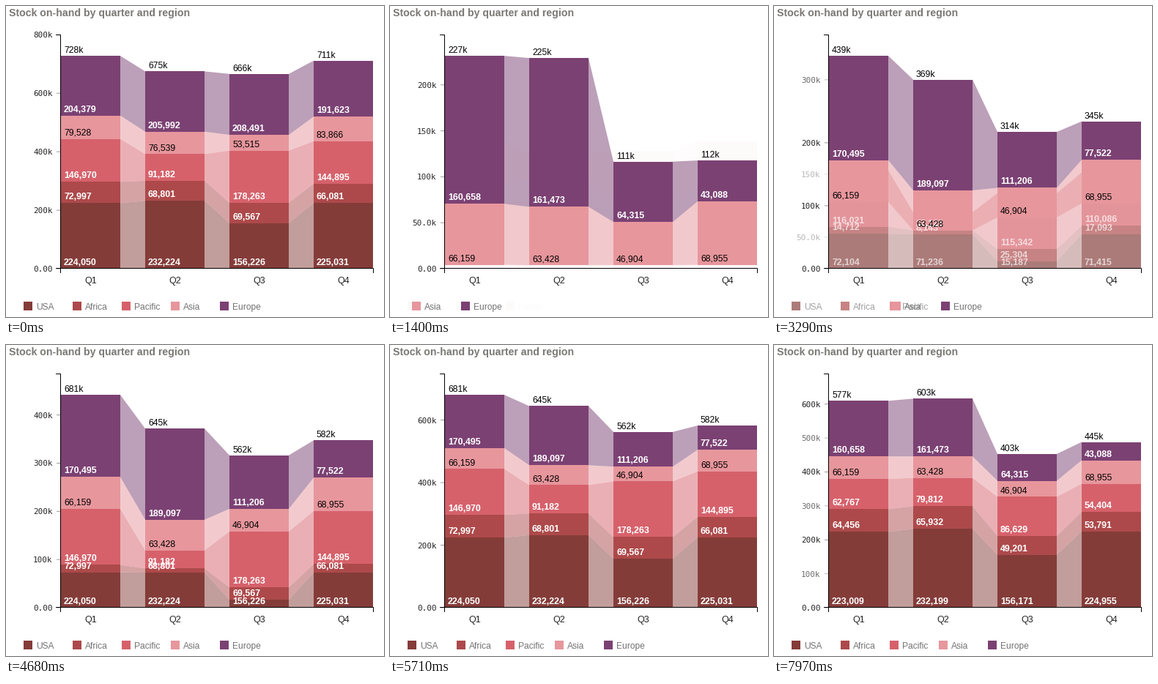
These frames come from a looping animation (516 px wide and 425 px high, 8 s). A matplotlib script:

```python
import matplotlib.pyplot as plt
import numpy as np
from matplotlib.animation import FuncAnimation
from matplotlib.collections import LineCollection, PolyCollection
from matplotlib.colors import to_rgba
from matplotlib.patches import Rectangle

W, H, DPI = 516, 425, 100
LOOP, STEP, FADE = 8000, 20, 1000
BASE, TOP, LEFT = 359, 39, 75
BAND, BAR = 115, 81
PT = 72 / DPI

REGIONS = ["USA", "Africa", "Pacific", "Asia", "Europe"]
COLORS = ["#843c39", "#ad494a", "#d6616b", "#e7969c", "#7b4173"]

USA = [224050, 232224, 156226, 225031]
AFRICA = [72997, 68801, 69567, 66081]
PACIFIC = [146970, 91182, 178263, 144895]
ASIA = [66159, 63428, 46904, 68955]
EUROPE_LOW = [160658, 161473, 64315, 43088]
EUROPE_MID = [170495, 189097, 111206, 77522]

# Rows follow REGIONS; None means the region is filtered out.
DATA = [
    [USA, AFRICA, PACIFIC, [79528, 76539, 53515, 83866],
     [204379, 205992, 208491, 191623]],
    [None, None, None, ASIA, EUROPE_LOW],
    [[72104, 71236, 15187, 71415], [14712, 8143, 25304, 17093],
     [116021, 37128, 115342, 110086], ASIA, EUROPE_MID],
    [USA, AFRICA, PACIFIC, ASIA, EUROPE_MID],
    [[223009, 232199, 156171, 224955], [64456, 65932, 49201, 53791],
     [62767, 79812, 86629, 54404], ASIA, EUROPE_LOW],
]
# (first visible moment, clock start) of each change of selection, in ms
CHANGES = [(500, 430), (2600, 2600), (4680, 4665), (7320, 7300)]


class State:
    """Layout of the chart for one selection."""

    def __init__(self, rows):
        self.rows = rows
        filled = np.array([r or [0] * 4 for r in rows], float)
        edges = np.vstack([np.zeros(4), filled.cumsum(axis=0)])
        self.totals = edges[-1]
        limit = 1.1 * self.totals.max()
        self.scale = (BASE - TOP) / limit
        self.y = BASE - edges * self.scale
        self.live = [r for r in range(5) if rows[r]]
        self.ticks = set(range(0, int(limit) + 1, tick_step(limit)))


def tick_step(span, count=5):
    step = 10 ** int(np.log10(span / count))
    err = count / span * step
    factor = 10 if err <= .15 else 5 if err <= .35 else 2 if err <= .75 else 1
    return step * factor


def tick_name(v):
    if v == 0:
        return "0.00"
    return f"{v / 1e3:.1f}k" if v < 1e5 else f"{v / 1e3:.0f}k"


STATES = [State(rows) for rows in DATA]

fig = plt.figure(figsize=(W / DPI, H / DPI), dpi=DPI, facecolor="white")
ax = fig.add_axes([0, 0, 1, 1])
ax.set_xlim(0, W)
ax.set_ylim(H, 0)
ax.axis("off")


def write(x, y, s="", px=12, color="black", font="Liberation Sans", **kw):
    return ax.text(x, y, s, fontsize=px * PT, color=color, family=font, **kw)


def line(xs, ys):
    ax.plot(xs, ys, color="black", lw=PT, zorder=6, snap=False,
            solid_capstyle="butt", solid_joinstyle="miter")


write(4, 14, "Stock on-hand by quarter and region", 14.15, "#7b7976",
      weight="bold")
line([68, 74.5, 74.5, 68], [TOP + .5, TOP + .5, BASE - .5, BASE - .5])
line([74.5, 74.5, 501.5, 501.5], [365, BASE - .5, BASE - .5, 365])
for q in range(4):
    write(LEFT + q * BAND + BAR / 2, 379, f"Q{q + 1}", 12.5, "#222222",
          ha="center")

gone = ax.add_collection(PolyCollection([], lw=0, zorder=1, snap=False))
shown = ax.add_collection(PolyCollection([], lw=0, zorder=3, snap=False))
marks = ax.add_collection(LineCollection([], lw=PT, zorder=5, snap=False))
tick_text = [write(63.5, 0, "", 11, "#222222", "DejaVu Sans Mono",
                   ha="right", va="center_baseline") for _ in range(12)]


def bar_x(q):
    return LEFT + q * BAND


def value_text(r, q):
    if r == 3:
        return write(bar_x(q) + 4, 0, px=12.1)
    return write(bar_x(q) + 4, 0, px=12.4, color="white", weight="bold")


labels = [[value_text(r, q) for q in range(4)] for r in range(5)]
totals = [write(bar_x(q) + 4, 0, px=12.1, zorder=5) for q in range(4)]

keys = []
for r, name in enumerate(REGIONS):
    box = ax.add_patch(Rectangle((0, 404), 12, 12, lw=0, fc=COLORS[r],
                                 zorder=7 + r))
    keys.append((box, write(0, 415, name, 12, "#737373", zorder=7.5 + r)))


def mix(a, b, p):
    return a + (b - a) * p


def moment(t):
    """Old state, new state and progress at time t."""
    i = sum(t >= seen for seen, _ in CHANGES)
    if i == 0:
        return STATES[0], STATES[0], 1
    p = (t - CHANGES[i - 1][1]) / FADE
    return STATES[i - 1], STATES[i], min(max(p, 0), 1)


def placed(r, old, new, p):
    """Bottom and top edges, opacity and label values of a region."""
    was, now = r in old.live, r in new.live
    if was and now:
        return mix(old.y[r:r + 2], new.y[r:r + 2], p), 1, new.rows[r]
    if now:
        return new.y[r:r + 2], p, new.rows[r]
    if was:
        return old.y[r:r + 2], 1 - p, old.rows[r]
    return new.y[r:r + 2], 0, [0] * 4


def draw_regions(old, new, p):
    links, bars = {True: [], False: []}, {True: [], False: []}
    for r in range(5):
        (low, high), alpha, values = placed(r, old, new, p)
        live = r in new.live
        for q in range(4):
            x0, x1 = bar_x(q), bar_x(q) + BAR
            label = labels[r][q]
            label.set_visible(alpha > 0)
            if alpha <= 0:
                continue
            # Bars have crisp edges, links are smooth.
            y0, y1 = round(low[q]), round(high[q])
            bars[live].append(([(x0, y0), (x1, y0), (x1, y1), (x0, y1)],
                               to_rgba(COLORS[r], alpha)))
            if q < 3:
                x2 = bar_x(q + 1)
                links[live].append((
                    [(x1, low[q]), (x2, low[q + 1]), (x2, high[q + 1]),
                     (x1, high[q])], to_rgba(COLORS[r], alpha / 2)))
            label.set_text(f"{values[q]:,}")
            label.set_y(low[q] - 5)
            label.set_alpha(alpha)
            label.set_zorder(4 if live else 2)
    for group, live in ((gone, False), (shown, True)):
        shapes = links[live] + bars[live]
        group.set_verts([v for v, _ in shapes])
        group.set_facecolor([c for _, c in shapes] or "none")
    tops = mix(old.y[-1], new.y[-1], p)
    for q, label in enumerate(totals):
        label.set_text(f"{new.totals[q] / 1e3:.0f}k")
        label.set_y(tops[q] - 4)


def draw_ticks(old, new, p):
    scale = mix(old.scale, new.scale, p)
    segments, colors = [], []
    for text in tick_text:
        text.set_visible(False)
    for text, v in zip(tick_text, sorted(old.ticks | new.ticks)):
        y = BASE - v * scale
        alpha = p * (v in new.ticks) + (1 - p) * (v in old.ticks)
        if y < 34 or alpha <= 0:
            continue
        text.set(text=tick_name(v), y=y, alpha=alpha, visible=True)
        segments.append([(69, y), (74, y)])
        colors.append(to_rgba("#999999", alpha))
    marks.set_segments(segments)
    marks.set_color(colors)


def draw_keys(old, new, p):
    for r, (box, text) in enumerate(keys):
        was, now = r in old.live, r in new.live
        alpha = p * now + (1 - p) * was
        a = old.live.index(r) if was else 0
        b = new.live.index(r) if now else a
        x = 24 + 67 * mix(a if was else b, b, p)
        box.set(x=x, alpha=alpha)
        text.set(x=x + 17, alpha=alpha)


def draw(i):
    scene = moment(i * STEP)
    draw_regions(*scene)
    draw_ticks(*scene)
    draw_keys(*scene)
    return []


anim = FuncAnimation(fig, draw, frames=LOOP // STEP, interval=STEP,
                     init_func=lambda: draw(0), repeat=True, repeat_delay=0)
plt.show()
```
